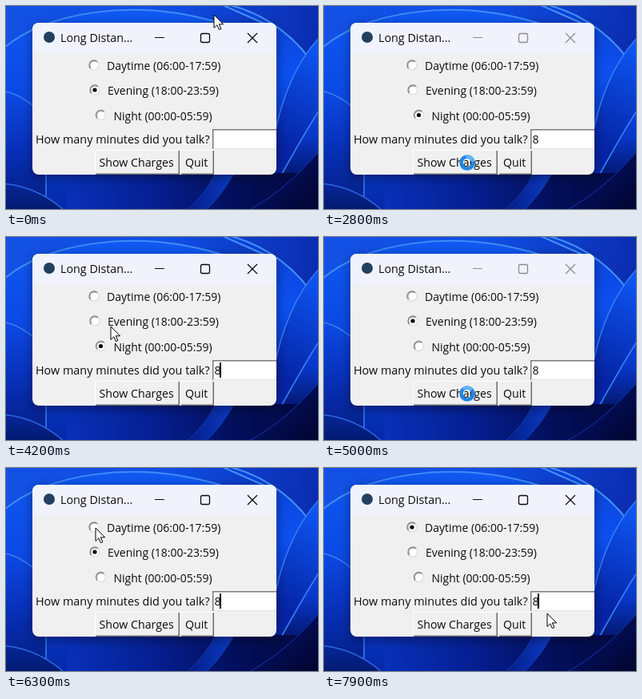
Animation of 390x254 px, one loop 8000 ms. Source, as an HTML page with a canvas:

```html
<!DOCTYPE html>
<html lang="en">
<head>
<meta charset="utf-8">
<title>Long Distance Calls</title>
<style>
  html, body { margin: 0; width: 100%; height: 100%; overflow: hidden; }
  canvas { display: block; }
</style>
</head>
<body>
<canvas width="390" height="254"></canvas>
<script>
const ctx = document.querySelector('canvas').getContext('2d');
const LOOP = 8000;
const INK = '#0c0c0c';

// Pointer path: time, x, y
const path = [
  [0, 260, 11], [200, 256, 18], [800, 117, 138], [1050, 117, 138], [1500, 288, 169],
  [2250, 288, 169], [2700, 179, 196], [3000, 179, 196], [3400, 224, 219],
  [3750, 224, 219], [4200, 131, 112], [4350, 112, 106], [4500, 112, 106],
  [4900, 179, 196], [5200, 179, 196], [5600, 243, 214], [5850, 243, 214],
  [6300, 112, 75], [6500, 112, 75], [6900, 179, 196], [7200, 179, 196],
  [7500, 236, 219], [7650, 236, 219], [7900, 279, 182], [8000, 279, 182]
];
const dialogs = [
  { ask: 2800, open: 3000, close: 3750, sum: '0.40' },
  { ask: 5000, open: 5200, close: 5850, sum: '0.96' },
  { ask: 7000, open: 7200, close: 7680, sum: '0.56' }
];
const radios = [
  ['Daytime (06:00-17:59)', 110, 74, 126],
  ['Evening (18:00-23:59)', 111, 105, 127],
  ['Night (00:00-05:59)', 118.5, 136.5, 134.5]
];

function pointerAt(t) {
  const i = path.findIndex(p => p[0] > t);
  const [t0, x0, y0] = path[i - 1], [t1, x1, y1] = path[i];
  const u = (t - t0) / (t1 - t0), k = u * u * (3 - 2 * u);
  return [x0 + (x1 - x0) * k, y0 + (y1 - y0) * k];
}

function rect(x, y, w, h, color) {
  ctx.fillStyle = color;
  ctx.fillRect(x, y, w, h);
}

function text(s, x, y, size = 14.2, color = INK, weight = 400) {
  ctx.font = `${weight} ${size}px "Open Sans", sans-serif`;
  ctx.fillStyle = color;
  ctx.fillText(s, x, y);
}

function disc(x, y, r, color) {
  ctx.fillStyle = color;
  ctx.beginPath();
  ctx.arc(x, y, r, 0, 7);
  ctx.fill();
}

function arc(x, y, r, from, to, color, width) {
  ctx.strokeStyle = color;
  ctx.lineWidth = width;
  ctx.beginPath();
  ctx.arc(x, y, r, from, to);
  ctx.stroke();
}

function line(d, color, width) {
  ctx.strokeStyle = color;
  ctx.lineWidth = width;
  ctx.stroke(new Path2D(d));
}

function gradient(x0, y0, x1, y1, ...colors) {
  const g = ctx.createLinearGradient(x0, y0, x1, y1);
  colors.forEach((c, i) => g.addColorStop(i / (colors.length - 1), c));
  return g;
}

function petal(d, fill, edge, width = 1.5) {
  ctx.fillStyle = fill;
  ctx.fill(new Path2D(d));
  line(d, edge, width);
}

function wallpaper() {
  rect(0, 0, 390, 254, gradient(0, 0, 390, 60, '#1450e4', '#0f4fe6', '#0a2cae'));
  petal('M-5 55C45 8 160-12 270 22L345 259H-5Z',
    gradient(0, 10, 0, 254, '#0f58f2', '#0a46e0', '#0528a8'), '#3f8cf8', 2);
  petal('M-5 106Q22 110 50 140V259H-5Z', gradient(0, 105, 0, 254, '#0d4ae6', '#0730b8', '#041c80'), '#3a80f4');
  petal('M262-5C325 5 372 45 395 92V259H330V25Z',
    gradient(0, 10, 0, 235, '#0c42d8', '#0c50f0', '#0838cc', '#020a48'), '#4592f8', 2);
  petal('M395 36C365 66 345 110 334 170V230Q372 160 395 125Z',
    gradient(335, 170, 395, 60, '#0524a4', '#0d54f0'), '#3a82f6');
  petal('M-5 222Q42 226 76 259H-5Z', gradient(0, 222, 0, 254, '#06279a', '#041a70'), '#2c68e0');
  rect(76, 209, 314, 45, gradient(76, 0, 390, 0, '#0830b8', '#052094', '#030f5c', '#020738'));
  petal('M222 259Q250 236 262 208H286Q268 240 246 259Z', gradient(222, 0, 286, 0, '#041a80', '#0b3cc8'), '#123cae', 1);
  petal('M296 259C335 240 365 212 395 178V259Z', gradient(320, 200, 370, 254, '#03126a', '#020636'), '#0c38b4', 1);
}

function panel(x, y, w, h, fill, blur) {
  ctx.save();
  ctx.shadowColor = 'rgba(0,0,0,.42)';
  ctx.shadowBlur = blur;
  ctx.shadowOffsetY = blur / 4;
  ctx.fillStyle = fill;
  ctx.beginPath();
  ctx.roundRect(x, y, w, h, 8);
  ctx.fill();
  ctx.restore();
  ctx.clip();
}

function cross(x, y, color) {
  line(`M${x - 6} ${y - 6}l12 12m0-12l-12 12`, color, 1.3);
}

function bevel(x, y, w, h, down) {
  rect(x, y, w, h, down ? '#777' : '#fff');
  rect(x + 1, y + 1, w - 1, h - 1, down ? '#fff' : '#6c6c6c');
  rect(x + 1, y + 1, w - 2.5, h - 2.5, '#f0f0f0');
}

function radio(x, y, on) {
  disc(x, y, 6.2, '#fff');
  arc(x, y, 6, 2.36, 5.5, '#858585', 1.4);
  arc(x, y, 6, -.78, 2.36, '#dadada', 1.2);
  arc(x, y, 4.9, 2.5, 5.3, '#a0a0a0', .9);
  if (on) disc(x, y, 2.6, '#000');
}

function mainWindow(t, call) {
  const covered = call && t >= call.open;
  ctx.save();
  ctx.beginPath();
  panel(33, 21, 305, 190, '#f0f0f0', 14);
  rect(33, 21, 305, 38, covered ? '#f1f1f1' : '#f0f3fb');
  disc(54, 39, 7, '#24405f');
  text('Long Distan...', 68, 45, 14.3, covered ? '#8a8a8a' : INK);
  const ink = call ? '#8c8c8c' : INK;
  rect(186, 39, 12, 1, ink);
  ctx.strokeStyle = ink;
  ctx.lineWidth = 1.3;
  ctx.beginPath();
  ctx.roundRect(243.5, 34.5, 11, 11, 2);
  ctx.stroke();
  cross(308, 40, ink);

  const choice = t < 900 ? 1 : t < 4420 ? 2 : t < 6400 ? 1 : 0;
  radios.forEach(([label, x, y, left], i) => {
    radio(x, y, i === choice);
    text(label, left, y + 6, 14);
  });

  text('How many minutes did you talk?', 37, 172, 14.4);
  rect(258, 154, 80, 25, '#7a7a7a');
  rect(259.5, 155.5, 79, 22.5, '#fff');
  rect(259, 178, 79, 1, '#e3e3e3');
  const typed = t >= 1950;
  if (typed) text('8', 260.5, 172);
  const focus = Math.max(1500, ...dialogs.map(d => d.close).filter(c => c <= t));
  if (!call && t >= focus && (t - focus) % 900 < 600) rect(typed ? 267 : 259.5, 157, 2, 19, '#000');

  const down = dialogs.some(d => t >= d.ask - 100 && t < d.ask);
  bevel(111, 180, 106, 31, down);
  bevel(218, 180, 42, 31, false);
  text('Show Charges', 116.5 + down, 201 + down);
  text('Quit', 224, 201);
  ctx.restore();
}

function dialog(sum) {
  ctx.save();
  ctx.beginPath();
  panel(62, 61, 252, 188, '#fff', 24);
  rect(62, 61, 252, 38, '#f0f1fa');
  rect(62, 197, 252, 52, '#f0f0f0');
  disc(83, 79, 7, '#24405f');
  text('Total Charges', 98, 85);
  cross(292, 80, INK);
  disc(108, 147.5, 20, gradient(95, 130, 120, 167, '#3fa0e4', '#2470c4'));
  disc(108, 139, 1.8, '#fff');
  rect(106.7, 143.5, 2.6, 14, '#fff');
  text('Total charges = $' + sum, 139, 154, 13.9);
  ctx.beginPath();
  ctx.roundRect(194, 211, 100, 25, 4);
  ctx.fillStyle = '#e1effa';
  ctx.fill();
  ctx.strokeStyle = '#2b87d0';
  ctx.lineWidth = 1.8;
  ctx.stroke();
  text('Tamam', 221.5, 229, 12.8, INK, 500);
  ctx.restore();
  ctx.strokeStyle = 'rgba(90,90,100,.5)';
  ctx.lineWidth = 1;
  ctx.beginPath();
  ctx.roundRect(61.5, 60.5, 253, 189, 8);
  ctx.stroke();
}

function pointer(t, call) {
  const [x, y] = pointerAt(t);
  ctx.save();
  ctx.translate(x, y);
  if (call && t < call.open) {
    arc(0, 0, 7.5, 0, 7, '#2386e6', 4.5);
    const a = t / 120;
    arc(0, 0, 7.5, a, a + 1.6, '#5db4f6', 4.5);
  } else if (!call && x > 259 && x < 338 && y > 155 && y < 178) {
    line('M-3-7.5h2.5m1 0h2.5M0-7V7M-3 7.5h2.5m1 0h2.5', '#000', 1.2);
  } else {
    const arrow = 'M0 0V16.4L3.8 12.8 6.4 18.6 8.9 17.5 6.3 11.8H11.6Z';
    ctx.fillStyle = '#fff';
    ctx.fill(new Path2D(arrow));
    line(arrow, '#000', 1);
  }
  ctx.restore();
}

function frame() {
  const t = performance.now() % LOOP;
  const call = dialogs.find(d => t >= d.ask && t < d.close);
  wallpaper();
  mainWindow(t, call);
  if (call && t >= call.open) dialog(call.sum);
  pointer(t, call);
  requestAnimationFrame(frame);
}
frame();
</script>
</body>
</html>
```
